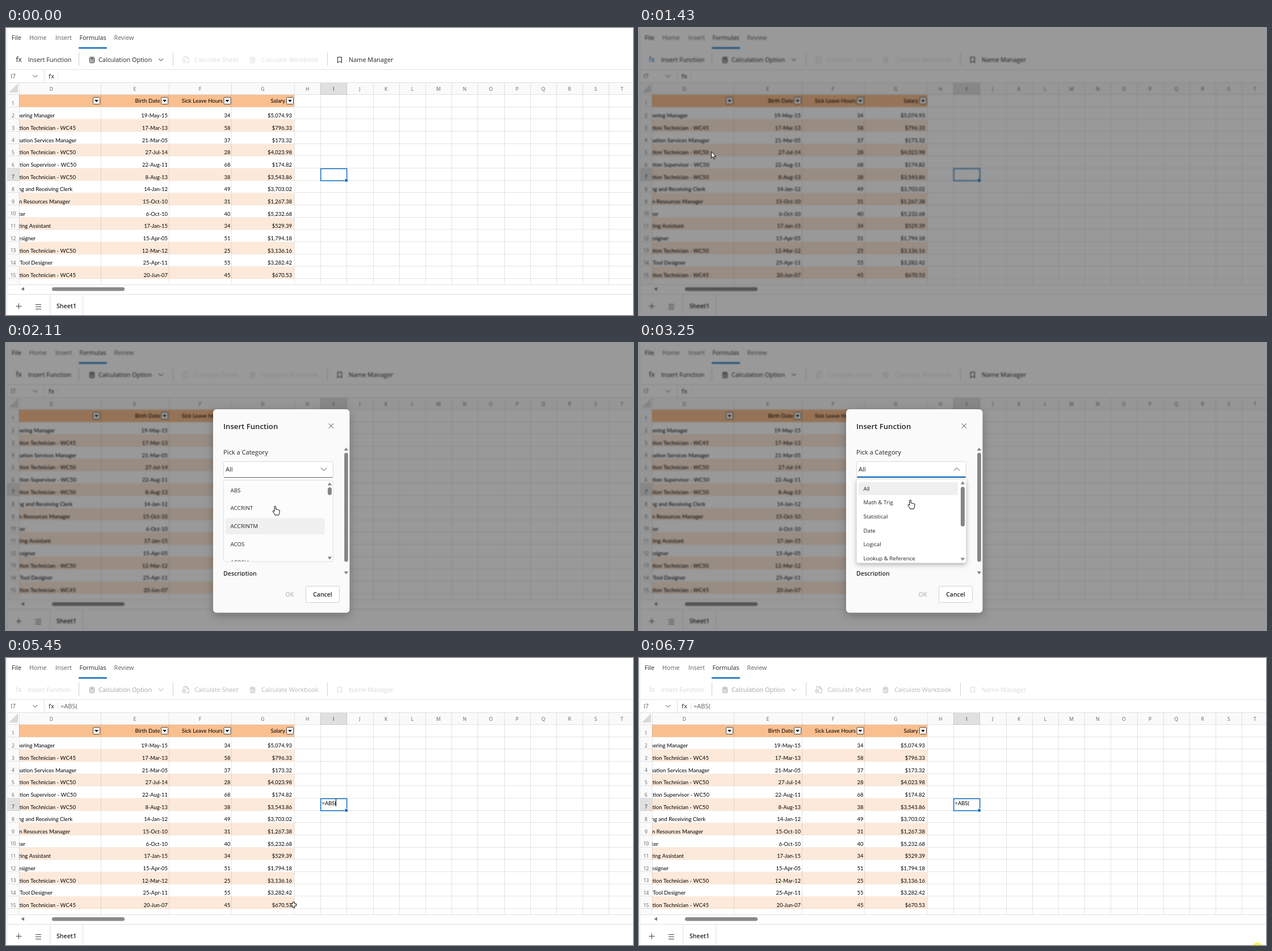
An HTML page with a canvas for the animation above (6850 ms loop, 1105x507 px).

```html
<!DOCTYPE html>
<html lang="en">
<head>
<meta charset="utf-8">
<title>Insert function</title>
<style>
html, body { margin: 0; width: 100%; height: 100%; overflow: hidden; background: #fff; }
canvas { display: block; width: 100vw; height: 100vh; }
</style>
</head>
<body>
<canvas id="stage" width="1105" height="507"></canvas>
<script>
const W = 1105, H = 507, LOOP = 6850;
const UI = '"Open Sans", "Noto Sans", sans-serif';
const CELL = 'Lato, "Open Sans", sans-serif';
const BLUE = '#0f6cbd', INK = '#242424', SOFT = '#616161', LINE = '#e0e0e0';
const ROW = 21.67, TOP = 118, COL = 46.2;
const stage = document.getElementById('stage').getContext('2d');

// When each thing happens, in ms
const AT = {
  hover: 810, tip: 880, open: 1430, drop: 2450, pick: 3500,
  choose: 4200, ok: 5310, edit: 5440
};

// Pointer path: time, x, y
const PATH = [
  [110, 1060, 512], [740, 62, 73], [810, 62, 58], [1240, 62, 60], [1310, 58, 72],
  [1370, 57, 121], [1550, 265, 408], [1700, 390, 380], [1890, 470, 338], [1960, 470, 338],
  [2310, 480, 222], [3040, 480, 222], [3250, 478, 277], [3770, 478, 277],
  [4100, 440, 258], [4510, 440, 258], [4630, 536, 393], [4850, 502, 441],
  [5310, 502, 441], [5510, 509, 434], [5770, 600, 520]
];

const JOBS = [
  ['Engineering Manager', 86, '19-May-15', 34, '$5,074.93'],
  ['Production Technician - WC45', 123, '17-Mar-13', 58, '$796.33'],
  ['Information Services Manager', 124, '21-Mar-05', 37, '$173.32'],
  ['Production Technician - WC50', 123, '27-Jul-14', 28, '$4,023.98'],
  ['Production Supervisor - WC50', 124, '22-Aug-11', 68, '$174.82'],
  ['Production Technician - WC50', 123, '8-Aug-13', 38, '$3,543.86'],
  ['Shipping and Receiving Clerk', 117, '14-Jan-12', 49, '$3,703.02'],
  ['Human Resources Manager', 113, '15-Oct-10', 31, '$1,267.38'],
  ['Recruiter', 34, '6-Oct-10', 40, '$5,232.68'],
  ['Marketing Assistant', 79, '17-Jan-15', 34, '$529.39'],
  ['Tool Designer', 52, '15-Apr-05', 51, '$1,794.18'],
  ['Production Technician - WC50', 123, '12-Mar-12', 25, '$3,136.16'],
  ['Senior Tool Designer', 82, '25-Apr-11', 55, '$3,282.42'],
  ['Production Technician - WC45', 123, '20-Jun-07', 45, '$670.53']
];
const GROUPS = ['All', 'Math & Trig', 'Statistical', 'Date', 'Logical', 'Lookup & Reference'];
const ALL = ['ABS', 'ACCRINT', 'ACCRINTM', 'ACOS', 'ACOSH'];
const MATH = ['ABS', 'ACOS', 'ACOSH', 'ACOT', 'ACOTH'];

const clamp = v => Math.max(0, Math.min(1, v));

function text(c, s, x, y, size, color = INK, { align = 'left', weight = 400, font = UI } = {}) {
  c.font = `${weight} ${size}px ${font}`;
  c.textAlign = align;
  c.fillStyle = color;
  c.fillText(s, x, y);
}

function rect(c, x, y, w, h, color) {
  c.fillStyle = color;
  c.fillRect(x, y, w, h);
}

function round(c, x, y, w, h, r, fill, stroke) {
  c.beginPath();
  c.roundRect(x, y, w, h, r);
  if (fill) { c.fillStyle = fill; c.fill(); }
  if (stroke) { c.strokeStyle = stroke; c.lineWidth = 1; c.stroke(); }
}

function line(c, pts, color, width = 1) {
  c.beginPath();
  for (let i = 0; i < pts.length; i += 2) c.lineTo(pts[i], pts[i + 1]);
  c.strokeStyle = color;
  c.lineWidth = width;
  c.stroke();
}

function poly(c, pts, color) {
  c.beginPath();
  for (let i = 0; i < pts.length; i += 2) c.lineTo(pts[i], pts[i + 1]);
  c.closePath();
  c.fillStyle = color;
  c.fill();
}

const hline = (c, y, x1 = 2, x2 = W, color = LINE) => rect(c, x1, y, x2 - x1, 1, color);
const vline = (c, x, y1, y2, color = LINE) => rect(c, x, y1, 1, y2 - y1, color);

function chevron(c, x, y, w, h, color = '#424242') {
  line(c, [x - w, y - h, x, y + h, x + w, y - h], color);
}

// A small solid triangle, dir -1 points up, 1 points down
function arrow(c, x, y, dir) {
  poly(c, [x - 3.7, y - 2.5 * dir, x + 3.7, y - 2.5 * dir, x, y + 2.7 * dir], '#858585');
}

function shadow(c, blur, dy, alpha, draw) {
  c.save();
  c.shadowColor = `rgba(0,0,0,${alpha})`;
  c.shadowBlur = blur;
  c.shadowOffsetY = dy;
  draw();
  c.restore();
}

function calcIcon(c, x, y, color) {
  round(c, x + .5, y + .5, 8, 10, 1, null, color);
  c.strokeRect(x + 2.5, y + 2.5, 4, 1.5);
  for (let i = 0; i < 6; i++) rect(c, x + 2 + (i % 3) * 2, y + 5.5 + (i / 3 | 0) * 2.2, 1.3, 1.3, color);
}

function sheetIcon(c, x, y, color) {
  line(c, [x + 2.5, y + 4, x + 2.5, y + .5, x + 7.5, y + .5, x + 11, y + 4, x + 11, y + 11.5, x + 7, y + 11.5], color);
  line(c, [x + 7.5, y + .5, x + 7.5, y + 4, x + 11, y + 4], color);
  round(c, x + .5, y + 5.5, 5, 6, 1, null, color);
  rect(c, x + 2, y + 7.5, 2, 2, color);
}

function drawRibbon(c, hover, edit) {
  const tabs = [['File', 10], ['Home', 41], ['Insert', 87], ['Formulas', 129.5], ['Review', 190.5]];
  tabs.forEach(([s, x], i) => text(c, s, x, 21, 10.8, i % 3 ? SOFT : INK));
  round(c, 128, 34, 50, 2.5, 1, BLUE);

  const main = edit ? '#d9d9d9' : INK;
  const calc = edit ? '#a3a3a3' : INK;
  const off = edit ? '#b8b8b8' : '#dedede';
  text(c, 'fx', 17.5, 60, 12, hover ? BLUE : main);
  text(c, 'Insert Function', 39, 60, 10.9, main);
  calcIcon(c, 147, 51, calc);
  text(c, 'Calculation Option', 163, 60, 10.9, calc);
  chevron(c, 273, 56, 4, 2, calc);
  sheetIcon(c, 311, 50, off);
  text(c, 'Calculate Sheet', 332, 60, 10.8, off);
  calcIcon(c, 430, 51, off);
  text(c, 'Calculate Workbook', 450, 60, 10.8, off);
  line(c, [584.5, 51.5, 591.5, 51.5, 591.5, 61.5, 588, 58.5, 584.5, 61.5, 584.5, 51], main);
  text(c, 'Name Manager', 604, 60, 10.9, main);
  [128, 294, 566].forEach(x => vline(c, x, 43, 67, '#d1d1d1'));
}

function drawFormulaBar(c, edit) {
  hline(c, 73);
  text(c, 'I7', 8, 89, 10.6, SOFT);
  chevron(c, 51.5, 85, 4, 2);
  vline(c, 67, 73, 96);
  text(c, 'fx', 75, 89, 11.5);
  vline(c, 91, 79, 91);
  if (edit) text(c, '=ABS(', 96, 89, 11.1, SOFT);
}

function filterButton(c, x) {
  round(c, x - 6, 122.5, 12, 12, 1, '#fff', '#4a4a4a');
  poly(c, [x - 3.3, 127, x + 3.3, 127, x, 131], '#000');
}

function drawGrid(c, edit) {
  const edges = [23, 167, 287, 397];
  for (let i = 0; i < 14; i++) edges.push(508 + COL * i);

  c.save();
  c.beginPath();
  c.rect(0, 96, W, 358);
  c.clip();
  rect(c, 2, 96, W, 22, '#fafafa');
  rect(c, 2, 96, 21, 358, '#fafafa');
  rect(c, 554, 96, 47, 22, '#e0e0e0');
  rect(c, 2, 248, 21, ROW, '#e0e0e0');
  rect(c, 23, TOP, 485, ROW, '#fabf8f');
  for (let r = 2; r < 16; r += 2) rect(c, 23, TOP + ROW * r, 485, ROW, '#fde9d9');

  const grid = 'rgba(0,0,0,.1)';
  edges.forEach(x => vline(c, Math.round(x), 96, 454, grid));
  for (let r = 0; r < 16; r++) {
    const y = Math.round(TOP - 1 + ROW * r);
    hline(c, y, 2, r % 2 || r === 0 ? 23 : 23, grid);
    hline(c, y, r ? 508 : 23, W, grid);
    if (r) hline(c, y, 23, 508, 'rgba(0,0,0,.035)');
  }
  hline(c, 96);
  poly(c, [5, 114, 21, 114, 21, 98], '#d9d9d9');

  for (let i = 0; i < 17; i++) {
    const x = i ? (edges[i] + edges[i + 1]) / 2 : 80;
    text(c, String.fromCharCode(68 + i), x, 110.5, 8.7, i === 5 ? INK : SOFT, { align: 'center' });
  }
  for (let r = 1; r < 16; r++) {
    text(c, r, 12.5, TOP + ROW * (r - 1) + 18.4, 8.5, r === 7 ? INK : SOFT, { align: 'center' });
  }

  c.beginPath();
  c.rect(23.5, 96, W, 358);
  c.clip();
  const right = { align: 'right', font: CELL };
  [['Birth Date', 271.5], ['Sick Leave Hours', 382], ['Salary', 492]]
    .forEach(([s, x]) => text(c, s, x, 132, 9.7, '#000', right));
  [159.5, 279.5, 390, 500.5].forEach(x => filterButton(c, x));
  JOBS.forEach(([job, x, date, hours, pay], i) => {
    const y = TOP + ROW * (i + 1) + 18.5;
    text(c, job, x, y, 9.6, '#000', right);
    text(c, date, 285, y, 9.4, '#000', right);
    text(c, hours, 395.5, y, 9.4, '#000', right);
    text(c, pay, 504, y, 9.5, '#000', right);
  });
  c.restore();

  c.strokeStyle = BLUE;
  c.lineWidth = 1.5;
  c.strokeRect(554.7, 248.5, 46, 21.2);
  rect(c, 596.5, 266, 6, 6, '#fff');
  rect(c, 597.3, 266.8, 4.7, 4.7, BLUE);
  if (edit) text(c, '=ABS(', 556.5, 260, 9.4, '#000', { font: CELL });
}

function drawFooter(c) {
  hline(c, 453);
  poly(c, [26.5, 461, 32, 457.8, 32, 464.2], '#757575');
  round(c, 81, 458, 128, 6.5, 3.2, '#8a8a8a');
  hline(c, 470);
  line(c, [17.5, 491.5, 27.5, 491.5], '#424242');
  line(c, [22.5, 486.5, 22.5, 496.5], '#424242');
  [488.5, 492.5, 496.5].forEach(y => line(c, [52, y, 62, y], '#424242'));
  vline(c, 77, 471, H);
  vline(c, 135, 471, H);
  text(c, 'Sheet1', 89, 495.3, 10.6, INK, { weight: 600 });
}

function drawSheet(c, hover, edit) {
  rect(c, 0, 0, W, H, '#fff');
  vline(c, 1, 0, H, '#e4e4e4');
  drawRibbon(c, hover, edit);
  drawFormulaBar(c, edit);
  drawGrid(c, edit);
  drawFooter(c);
}

function layer(draw) {
  const cv = document.createElement('canvas');
  cv.width = W;
  cv.height = H;
  draw(cv.getContext('2d'));
  return cv;
}

const cache = {};
function sheet(hover, edit, dim) {
  const key = [hover, edit, dim].join();
  return cache[key] ||= layer(c => {
    if (!dim) return drawSheet(c, hover, edit);
    const plain = sheet(hover, edit, false);
    c.drawImage(plain, 0, 0);
    c.filter = 'blur(1.2px)';
    c.drawImage(plain, 0, 0);
    c.filter = 'none';
    rect(c, 0, 0, W, H, 'rgba(0,0,0,.4)');
  });
}

function drawTooltip(c, alpha) {
  c.globalAlpha = alpha;
  shadow(c, 6, 2, .3, () => {
    round(c, 31, 76, 70, 29, 3, '#fff');
    poly(c, [60, 76.5, 66, 71.5, 72, 76.5], '#fff');
  });
  rect(c, 58, 76, 16, 3, '#fff');
  text(c, 'Insert Function', 65.7, 93, 8.2, INK, { align: 'center' });
  c.globalAlpha = 1;
}

function drawSelect(c, t) {
  const focus = t >= AT.drop && t < AT.choose;
  const up = t >= AT.drop && t < AT.pick;
  round(c, 383.5, 209.5, 193, 28, 3, '#fff', '#d8d8d8');
  if (focus) {
    const w = 192 * clamp((t - AT.drop + 60) / 200);
    round(c, 480 - w / 2, 235.7, w, 2.3, 1, BLUE);
  } else {
    hline(c, 237, 384, 576, SOFT);
  }
  text(c, t < AT.pick ? 'All' : 'Math & Trig', 387, 227.3, 11);
  chevron(c, 560, 223, 5, up ? -2.5 : 2.5);
}

function drawList(c, t, hand) {
  round(c, 383.5, 242.5, 193, 143.5, 3, '#fcfcfc', LINE);
  c.save();
  c.beginPath();
  c.rect(384, 243, 192, 142.5);
  c.clip();
  const inside = hand.x > 384 && hand.x < 563 && hand.y > 244 && hand.y < 386;
  const over = inside && (t < AT.drop || t > AT.pick) ? Math.floor((hand.y - 244) / 31.8) : -1;
  (t < AT.pick ? ALL : MATH).forEach((s, i) => {
    const y = 260 + i * 31.8;
    const chosen = i === 0 && t >= AT.choose;
    if (chosen || i === over) round(c, 387, y - 14, 175, 28.5, 3, chosen ? '#e6e6e6' : '#f0f0f0');
    text(c, s, 395.5, y + 3.6, 9.8);
  });
  c.restore();
  arrow(c, 570.5, 249, -1);
  round(c, 567, 255, 7, 13.5, 3.5, '#858585');
  arrow(c, 570.5, 380, 1);
}

function drawPopup(c, alpha, hand) {
  c.globalAlpha = alpha;
  shadow(c, 8, 3, .3, () => round(c, 383.5, 240.5, 193, 148, 3, '#fff'));
  round(c, 383.5, 240.5, 193, 148, 3, null, '#e4e4e4');
  GROUPS.forEach((s, i) => {
    const y = 257.3 + i * 24.55;
    const over = Math.abs(hand.y - y) < 12.2 && hand.y > 245;
    if (i === 0 || over) round(c, 387, y - 11.5, 175, 23, 3, over ? '#efefef' : '#f5f5f5');
    text(c, s, 395.5, y + 3.6, 9.7);
  });
  arrow(c, 570.5, 247, -1);
  round(c, 567, 254, 7, 70, 3.5, '#858585');
  arrow(c, 570.5, 382, 1);
  c.globalAlpha = 1;
}

function drawDialog(c, t, hand) {
  const bold = { weight: 600 }, mid = { weight: 600, align: 'center' };
  shadow(c, 16, 5, .25, () => round(c, 365, 117, 240.5, 359.5, 6, '#fafafa'));
  text(c, 'Insert Function', 383, 152, 13.2, INK, bold);
  line(c, [568.7, 142.2, 577.3, 150.8], '#424242');
  line(c, [577.3, 142.2, 568.7, 150.8], '#424242');
  text(c, 'Pick a Category', 383, 197, 11.1);
  drawSelect(c, t);
  drawList(c, t, hand);

  c.save();
  c.beginPath();
  c.rect(366, 395, 225, 16.5);
  c.clip();
  text(c, 'Description', 383, 411, 10.6, INK, bold);
  c.restore();

  const chosen = t >= AT.choose;
  arrow(c, 599.5, 187.5, -1);
  round(c, 596.2, 194, 6.6, chosen ? 169 : 192.5, 3.3, '#858585');
  arrow(c, 599.5, 406, 1);

  if (chosen) round(c, 480, 429, 40, 30, 3, hand.y > 429 && hand.x < 520 ? '#115ea3' : BLUE);
  text(c, 'OK', 500, 447.8, 10.6, chosen ? '#fff' : '#bdbdbd', mid);
  round(c, 528.5, 429.5, 59, 29, 3, '#fff', '#d1d1d1');
  text(c, 'Cancel', 558, 447.8, 10.5, INK, mid);
}

// The dialog is flattened first, so that fading keeps its parts opaque to each other
const flat = layer(() => {});
function fadeDialog(c, t, hand, alpha) {
  const d = flat.getContext('2d');
  d.clearRect(0, 0, W, H);
  drawDialog(d, t, hand);
  c.globalAlpha = alpha;
  c.drawImage(flat, 0, 0);
  c.globalAlpha = 1;
}

function pointer(t) {
  const i = PATH.findIndex(p => p[0] > t);
  if (i < 1) return { x: -50, y: -50 };
  const [a, x, y] = PATH[i - 1], [b, x2, y2] = PATH[i];
  const k = (t - a) / (b - a);
  return { x: x + (x2 - x) * k, y: y + (y2 - y) * k };
}

const SHAPES = {
  arrow: new Path2D('M0 0V11.5L2.7 9L4.6 13.2L6.4 12.4L4.6 8.4H8.2Z'),
  hand: new Path2D('M-1.3 1Q0 -.8 1.3 1V6Q2.6 5 3.8 6.4Q5 5.6 6 7Q7.6 6.6 7.8 8V11.5Q7.6 14 6.2 16H-.2Q-1 13.5 -3.4 11Q-4.8 9 -3.6 8.4Q-2.6 8 -1.3 9.6Z'),
  cross: new Path2D('M-1.7 -5H1.7V-1.7H5V1.7H1.7V5H-1.7V1.7H-5V-1.7H-1.7Z')
};

function pointerShape(t, { x, y }) {
  const within = (l, r, a, b) => x > l && x < r && y > a && y < b;
  if (t >= AT.open && t < AT.edit) {
    const open = t > 1600;
    return open && (within(384, 576, 209, 386) || within(480, 588, 429, 459)) ? 'hand' : 'arrow';
  }
  if (within(8, 122, 44, 72)) return 'hand';
  return y < 96 || (t > 1240 && t < AT.open) ? 'arrow' : 'cross';
}

function drawPointer(c, t) {
  const p = pointer(t);
  const shape = SHAPES[pointerShape(t, p)];
  c.save();
  c.translate(p.x, p.y);
  c.fillStyle = '#fff';
  c.strokeStyle = '#000';
  c.lineWidth = 1;
  c.lineJoin = 'round';
  c.fill(shape);
  c.stroke(shape);
  c.restore();
}

function render(t) {
  const c = stage;
  const edit = t >= AT.edit;
  const dim = t >= AT.open && !edit;
  const hand = pointer(t - 60);
  c.drawImage(sheet(t >= AT.hover && t < 1620, edit, dim), 0, 0);

  if (t >= AT.tip && t < AT.open) drawTooltip(c, clamp((t - AT.tip + 40) / 210));
  if (dim) {
    const fade = clamp((t - AT.open) / 240) * clamp((AT.edit - t) / (AT.edit - AT.ok));
    fadeDialog(c, t, hand, fade);
    const popup = clamp((t - AT.drop) / 200) * clamp((AT.pick + 140 - t) / 140);
    if (popup > 0) drawPopup(c, popup, hand);
  }
  if (edit && (t < 5970 || (t >= 6500 && t < 6700))) vline(c, 581, 249, 262, '#000');
  drawPointer(c, t);
  if (t >= 6770) {
    c.beginPath();
    c.arc(1090, 512, 9.5, 0, 7);
    c.fillStyle = '#fff34a';
    c.fill();
  }
}

const start = performance.now();
function tick() {
  render((performance.now() - start) % LOOP);
  requestAnimationFrame(tick);
}
tick();
</script>
</body>
</html>
```
